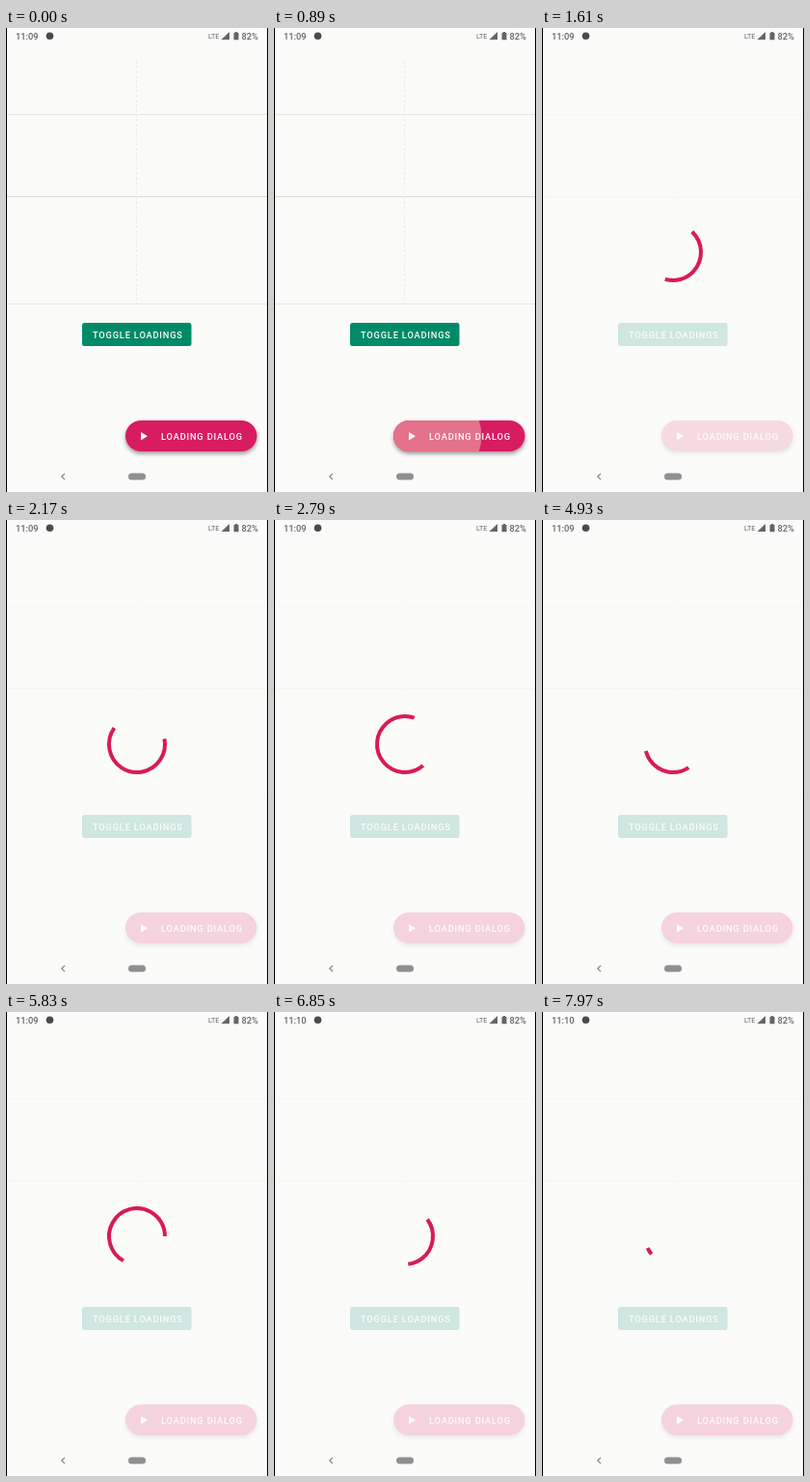
Recreate the animation shown at these times as an HTML page. Size 272 px wide and 480 px high, loop 7990 ms.

```html
<!DOCTYPE html>
<html lang="en">
<head>
<meta charset="utf-8">
<title>Loading dialog</title>
<style>
  html, body { margin: 0; width: 100%; height: 100%; overflow: hidden; background: #fbfbfa; }
  svg { display: block; width: 100%; height: 100%; }
  text { font-family: Roboto, "Noto Sans", sans-serif; }
  .label { font-size: 9.26px; font-weight: 500; letter-spacing: .83px; fill: #fff; }
  .status { font-size: 9.3px; font-weight: 500; fill: #646468; }
</style>
</head>
<body>
<svg viewBox="0 0 272 480">
  <defs>
    <filter id="shadow" x="-20%" y="-40%" width="140%" height="200%">
      <feDropShadow dx="0" dy="2.5" stdDeviation="2" flood-color="#000" flood-opacity=".4"/>
    </filter>
    <clipPath id="fabClip"><rect x="124" y="406" width="136.500" height="32" rx="16"/></clipPath>
  </defs>

  <rect width="272" height="480" fill="#fbfbfa"/>

  <g fill="none" stroke-width="1">
    <path d="M1 89.500H271M1 285.500H271" stroke="#e6e6e2"/>
    <path d="M1 174.500H271" stroke="#dadad0"/>
    <path d="M135.500 34V285" stroke="#ececea" stroke-dasharray="3 2"/>
  </g>
  <rect x="79" y="305" width="113.500" height="24" rx="2.500" fill="#008a68"/>
  <rect x="124" y="406" width="136.500" height="32" rx="16" fill="#d81b60" filter="url(#shadow)"/>
  <circle id="ripple" cy="422" fill="#e4728a" clip-path="url(#fabClip)"/>
  <text class="label" x="90" y="320.700">TOGGLE LOADINGS</text>
  <path d="M140 418v8.400l7-4.200z" fill="#fff"/>
  <text class="label" x="161" y="425.700">LOADING DIALOG</text>

  <g id="dialog">
    <rect width="272" height="480" fill="#fcfcfb" fill-opacity=".82"/>
    <circle id="spinner" cx="136" cy="232" r="29" pathLength="360"
            fill="none" stroke="#d81b58" stroke-width="4"/>
  </g>

  <g fill="#646468">
    <text id="clock" class="status" x="10" y="11.700">11:09</text>
    <circle cx="45.500" cy="8.300" r="3.800" fill="#4a4a4c"/>
    <text x="210" y="11" font-size="7.200">LTE</text>
    <path d="M232 4v8h-8.500z"/>
    <path d="M237.800 4h2.400v1h1.300v7.300h-5V5h1.300z"/>
    <text class="status" x="244.500" y="11.700">82%</text>
  </g>
  <path d="M61 460.800L57.800 464L61 467.200" fill="none" stroke="#808084" stroke-width="1.200"/>
  <rect x="127" y="460.500" width="18" height="7" rx="3.500" fill="#8f8f92"/>
  <path d="M.5 0V480M271.500 0V480" stroke="#000"/>
</svg>

<script>
  const LOOP = 7990;
  const SPIN = { start: 6.2, half: 39.5, turn: 3, sweep: 241, min: 14.5, offset: -17 };
  const el = id => document.getElementById(id);
  const [ripple, dialog, spinner, clock] = ['ripple', 'dialog', 'spinner', 'clock'].map(el);

  const clamp = x => Math.min(1, Math.max(0, x));
  const easeOut = x => 1 - (1 - clamp(x)) ** 2;
  const lerp = (a, b, p) => a + (b - a) * p;

  const holdAt = k => 20 * Math.round((1460 + 145.6 * k) / 20) + 10;
  const stepTimes = [];
  for (let k = -5; k < 45; k++) {
    stepTimes.push(holdAt(k));
    for (let t = holdAt(k) + 100; t < holdAt(k + 1); t += 20) stepTimes.push(t);
  }
  const stepAt = t => stepTimes.filter(s => s <= t).length;

  // The ripple grows from the touch point towards the middle of the button.
  function drawRipple(step) {
    const grown = easeOut(step / 11);
    ripple.setAttribute('cx', lerp(126, 192, grown));
    ripple.setAttribute('r', lerp(21, 70, grown));
    ripple.setAttribute('opacity', Math.min(clamp(step / 4), clamp((26 - step) / 14)));
  }

  function drawSpinner(step) {
    const phase = Math.max(0, (step - SPIN.start) / SPIN.half);
    const cycle = Math.floor(phase / 2);
    const part = phase - 2 * cycle;
    const base = SPIN.turn * step + SPIN.offset + SPIN.sweep * cycle;
    const tail = base + SPIN.sweep * easeOut(part - 1);
    const head = base + SPIN.min + SPIN.sweep * easeOut(part);
    spinner.setAttribute('stroke-dasharray', `${head - tail} 360`);
    spinner.setAttribute('transform', `rotate(${tail - 90} 136 232)`);
  }

  function draw(t) {
    const step = stepAt(t);
    drawRipple(step);
    drawSpinner(step);
    dialog.setAttribute('opacity', clamp((step - 6) / 9));
    clock.textContent = step < 125 ? '11:09' : '11:10';
  }

  const begin = performance.now();
  function tick() {
    draw((performance.now() - begin) % LOOP);
    requestAnimationFrame(tick);
  }
  tick();
</script>
</body>
</html>
```
